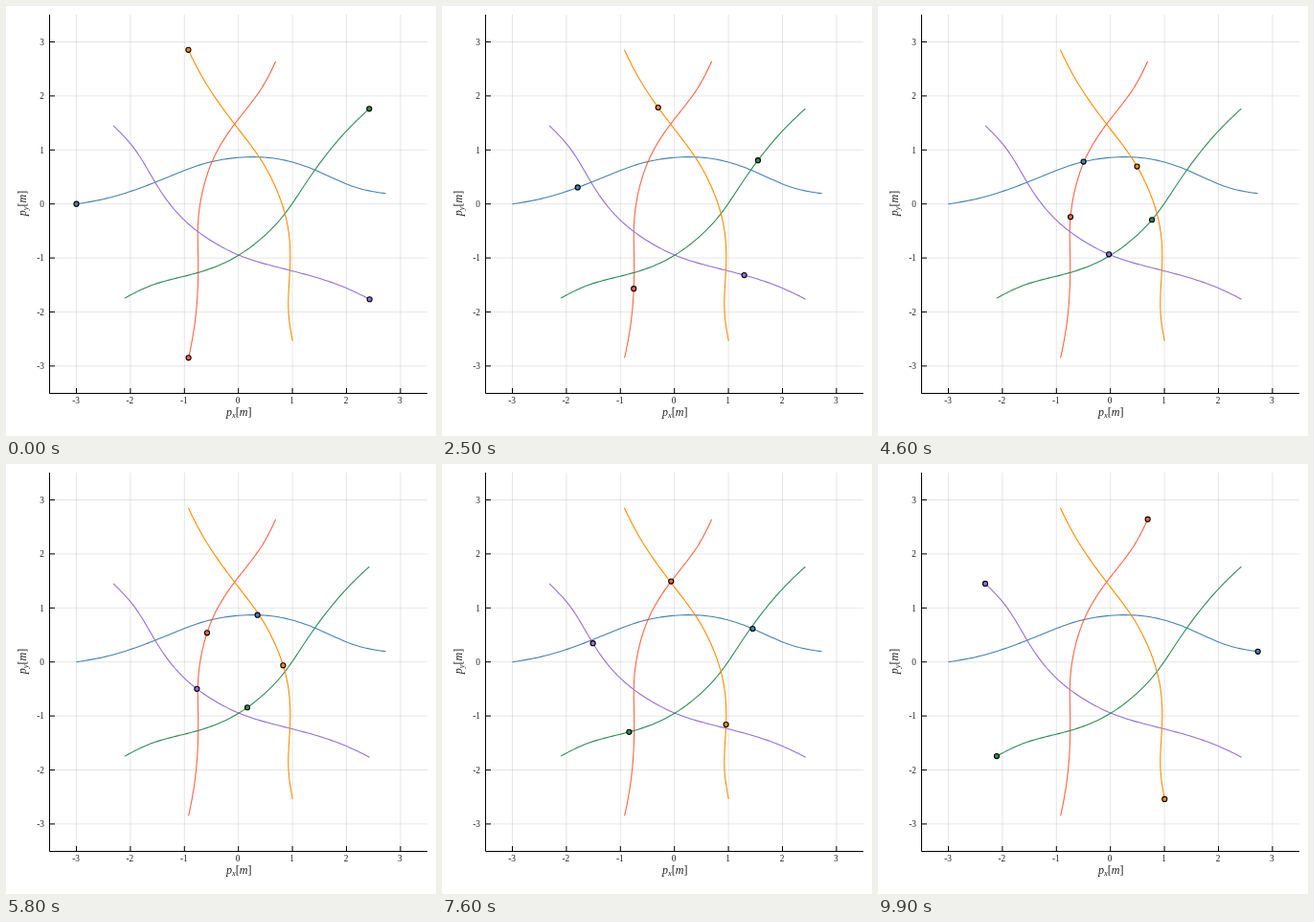
These frames come from a looping animation (449x449 px, 10000 ms). An HTML page:

```html
<!DOCTYPE html>
<html lang="en">
<head>
<meta charset="utf-8">
<title>Crossing trajectories</title>
<style>
  html, body { margin: 0; width: 100%; height: 100%; overflow: hidden; background: #fff; }
  svg { display: block; width: 449px; height: 449px; }
  text { font-family: "Liberation Serif", "Noto Serif", serif; font-size: 9.3px; fill: #222; }
  .label { font-size: 12px; text-anchor: middle; }
  .label .var { font-style: italic; }
  .label .sub { font-style: italic; font-size: 8.5px; }
  .grid { stroke: #000; stroke-opacity: .1; }
  .axis { stroke: #000; fill: none; }
  .path { fill: none; stroke-width: 1.1; stroke-linejoin: round; }
  .dot { stroke: #000; stroke-width: 1.1; }
</style>
</head>
<body>
<svg id="plot" viewBox="0 0 449 449"></svg>
<script>
const FRAMES = 100, STEP = 100;
const LEFT = 45.5, RIGHT = 440, TOP = 9, BOTTOM = 404.5;
const px = v => 242.7 + 56.4 * v;
const py = v => 206.7 - 56.4 * v;

// Shared route from (-3, 0) heading right: seconds, forward, sideways
const ROUTE = [
  [0, -3, 0], [1.5, -2.4, .113], [3.4, -1.245, .521], [4.6, -.498, .782],
  [5.8, .353, .869], [7.6, 1.449, .615], [8.8, 2.142, .318], [9.9, 2.73, .193]
];

// Each agent drives the route turned by a further fifth of a circle.
// sway scales the detour, early and late are leads before and after the crossing.
const AGENTS = [
  { color: '#4682b4', sway: 1, early: 0, late: 0 },
  { color: '#ff6347', sway: .82, early: .077, late: -.056 },
  { color: '#9370db', sway: .975, early: -.035, late: -.028 },
  { color: '#2e8b57', sway: .9, early: .076, late: -.01 },
  { color: '#ff8c00', sway: .87, early: 0, late: -.057 }
];

// Cubic spline that starts at rest and has a free end
function spline(t, v) {
  const n = t.length - 1;
  const h = i => t[i + 1] - t[i];
  const rise = i => (v[i + 1] - v[i]) / h(i);
  const c = [0], m = [0];
  for (let i = 1; i <= n; i++) {
    const last = i === n;
    const a = last ? 1 : h(i);
    const b = last ? 2 : 2 * (h(i - 1) + h(i));
    const up = last ? 0 : h(i - 1);
    const d = last ? 3 * rise(i - 1) : 3 * (h(i) * rise(i - 1) + h(i - 1) * rise(i));
    const w = b - a * c[i - 1];
    c[i] = up / w;
    m[i] = (d - a * m[i - 1]) / w;
  }
  for (let i = n - 1; i >= 0; i--) m[i] -= c[i] * m[i + 1];

  return time => {
    let i = 0;
    while (i < n - 1 && time > t[i + 1]) i++;
    const k = h(i), s = (time - t[i]) / k, r = 1 - s;
    return r * r * ((1 + 2 * s) * v[i] + s * k * m[i])
         + s * s * ((1 + 2 * r) * v[i + 1] - r * k * m[i + 1]);
  };
}

const column = i => ROUTE.map(row => row[i]);
const forward = spline(column(0), column(1));
const sideways = spline(column(0), column(2));
const bump = (t, center, width) => Math.exp(-(((t - center) / width) ** 2));

function position({ sway, early, late }, index, t) {
  const lead = early * bump(t, 3.3, 2) + late * bump(t, 7, 1.8);
  const x = forward(t) + lead;
  const y = sway * sideways(t) - .3 * lead;
  const turn = index * 2 * Math.PI / AGENTS.length;
  const cos = Math.cos(turn), sin = Math.sin(turn);
  return [px(x * cos - y * sin), py(x * sin + y * cos)];
}

const plot = document.getElementById('plot');

function add(name, attrs, parent = plot) {
  const el = document.createElementNS('http://www.w3.org/2000/svg', name);
  for (const key in attrs) el.setAttribute(key, attrs[key]);
  parent.appendChild(el);
  return el;
}

const line = (cls, x1, y1, x2, y2) => add('line', { class: cls, x1, y1, x2, y2 });

function tickText(value, x, y, anchor) {
  add('text', { x, y, 'text-anchor': anchor }).textContent = value;
}

function axisLabel(sub, attrs) {
  const el = add('text', { class: 'label', ...attrs });
  add('tspan', { class: 'var' }, el).textContent = 'p';
  add('tspan', { class: 'sub', dy: 2 }, el).textContent = sub;
  add('tspan', { dy: -2 }, el).textContent = '[';
  add('tspan', { class: 'var' }, el).textContent = 'm';
  add('tspan', {}, el).textContent = ']';
}

for (let v = -3; v <= 3; v++) {
  line('grid', px(v), TOP, px(v), BOTTOM);
  line('grid', LEFT, py(v), RIGHT, py(v));
}
for (let v = -3; v <= 3; v++) {
  line('axis', px(v), BOTTOM, px(v), BOTTOM - 5.5);
  line('axis', LEFT, py(v), LEFT + 5.5, py(v));
  tickText(v, px(v) - .5, 414.5, 'middle');
  tickText(v, 40, py(v) + 3.2, 'end');
}
add('path', { class: 'axis', d: `M${LEFT} ${TOP}V${BOTTOM}H${RIGHT}` });
axisLabel('x', { x: 243.3, y: 427.5 });
axisLabel('y', { transform: 'translate(20.5 206) rotate(-90)' });

AGENTS.forEach((agent, index) => {
  agent.track = Array.from({ length: FRAMES }, (_, i) => position(agent, index, i * STEP / 1000));
  const points = agent.track.map(p => p.map(c => c.toFixed(2)).join()).join(' ');
  add('polyline', { class: 'path', stroke: agent.color, points });
});
for (const agent of AGENTS) {
  agent.dot = add('circle', { class: 'dot', r: 2.55, fill: agent.color });
}

const start = performance.now();

function draw() {
  const frame = Math.floor((performance.now() - start) / STEP) % FRAMES;
  for (const { dot, track } of AGENTS) {
    dot.setAttribute('cx', track[frame][0]);
    dot.setAttribute('cy', track[frame][1]);
  }
  requestAnimationFrame(draw);
}
draw();
</script>
</body>
</html>
```
